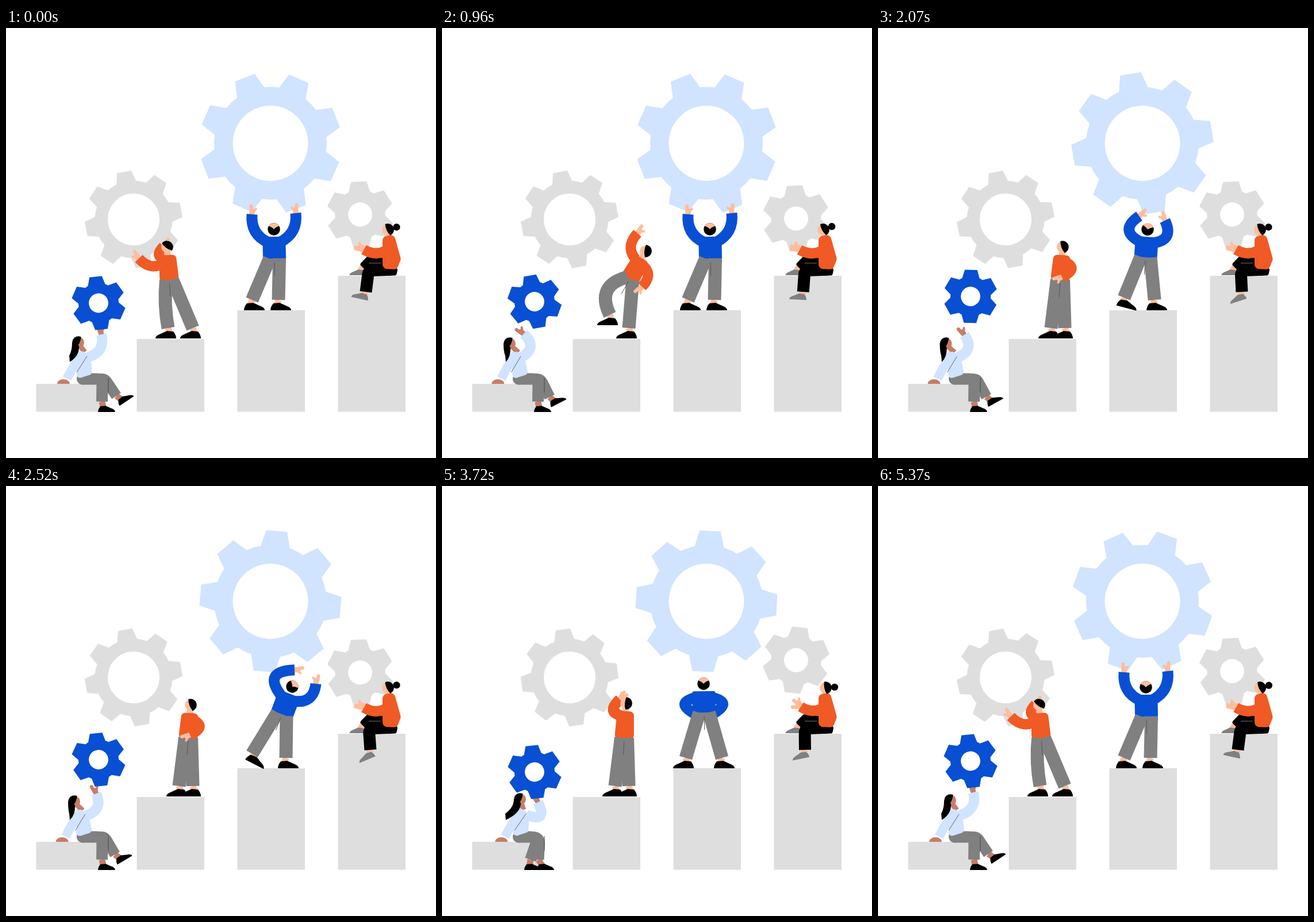
Write an HTML page with a canvas that moves like this. It is 748 px wide and 748 px high and loops after 5.4 s.

```html
<!DOCTYPE html>
<html lang="en">
<head>
<meta charset="utf-8">
<title>Gears and steps</title>
<style>
html, body { margin: 0; width: 100%; height: 100%; overflow: hidden; background: #fff; }
canvas { display: block; }
</style>
</head>
<body>
<canvas id="stage" width="748" height="748"></canvas>
<script>
const c = document.getElementById('stage').getContext('2d');
const LOOP = 5400, STEP = 30, TAU = 2 * Math.PI;
const KEYS = [0, 960, 1560, 2520, 3720, 4530, 5370, LOOP];
const GREY = '#dedede', PALE = '#d0e3ff', BLUE = '#084fd3', ORANGE = '#f05a24',
  PANTS = '#808080', SKIN = '#ffbd9d', BROWN = '#c67d68', BLACK = '#000';
const rad = d => d * Math.PI / 180;
const smooth = u => u * u * (3 - 2 * u);

// Blends numbers, points or whole poses.
function mix(a, b, u) {
  if (typeof a === 'number') return a + (b - a) * u;
  if (Array.isArray(a)) return a.map((v, i) => mix(v, b[i], u));
  return Object.fromEntries(Object.keys(a).map(k => [k, mix(a[k], b[k], u)]));
}
function sample(list, t, ease = smooth) {
  let i = 0;
  while (t >= KEYS[i + 1]) i++;
  return mix(list[i] ?? list[0], list[i + 1] ?? list[0], ease((t - KEYS[i]) / (KEYS[i + 1] - KEYS[i])));
}

// ---- drawing helpers ----
function placed(x, y, angle, draw) {
  c.save();
  c.translate(x, y);
  c.rotate(angle);
  draw();
  c.restore();
}
function disc(x, y, r, color) {
  c.fillStyle = color;
  c.beginPath();
  c.arc(x, y, r, 0, TAU);
  c.fill();
}
function line(color, w, x0, y0, x1, y1, cap = 'butt') {
  c.strokeStyle = color;
  c.lineWidth = w;
  c.lineCap = cap;
  c.beginPath();
  c.moveTo(x0, y0);
  c.lineTo(x1, y1);
  c.stroke();
}
// Point beside the middle of a segment, where the elbow or knee pulls the curve.
function pull(x0, y0, x1, y1, bow) {
  const dx = x1 - x0, dy = y1 - y0, k = 2 * bow / Math.hypot(dx, dy);
  return [(x0 + x1) / 2 + dy * k, (y0 + y1) / 2 - dx * k];
}
function limb(color, w, x0, y0, x1, y1, bow = 0) {
  c.strokeStyle = color;
  c.lineWidth = w;
  c.lineCap = 'butt';
  c.beginPath();
  c.moveTo(x0, y0);
  c.quadraticCurveTo(...pull(x0, y0, x1, y1, bow), x1, y1);
  c.stroke();
}
function hand(x, y, angle, side, color) {
  placed(x, y, angle, () => {
    line(color, 9, -2, 0, 6, 0, 'round');
    line(color, 6, 4, -2 * side, 14, -3 * side, 'round');
    line(color, 4, 5, 2 * side, 10, 6 * side, 'round');
  });
}
function arm(color, skin, w, x, y, [hx, hy, bow], side) {
  const [px, py] = pull(x, y, hx, hy, bow);
  hand(hx, hy, Math.atan2(hy - py, hx - px), side, skin);
  limb(color, w, x, y, hx, hy, bow);
}
// Seated leg with a rounded knee.
function bentLeg(color, w, x0, y0, x1, y1, x2, y2) {
  disc(x0, y0, w / 2, color);
  c.strokeStyle = color;
  c.lineWidth = w;
  c.lineCap = 'butt';
  c.beginPath();
  c.moveTo(x0, y0);
  c.arcTo(x1, y1, x2, y2, 10);
  c.lineTo(x2, y2);
  c.stroke();
}
function poly(p, r, color) {
  const n = p.length;
  c.fillStyle = color;
  c.beginPath();
  c.moveTo((p[0] + p[n - 2]) / 2, (p[1] + p[n - 1]) / 2);
  for (let i = 0; i < n; i += 2) c.arcTo(p[i], p[i + 1], p[(i + 2) % n], p[(i + 3) % n], r);
  c.closePath();
  c.fill();
}
function shoe(x, y, deg, dir, hx, hy, skin, color, s = 1) {
  placed(x, y, rad(deg), () => {
    const heel = c.getTransform().transformPoint(new DOMPoint(-7 * dir * s, -9 * s));
    c.save();
    c.resetTransform();
    line(skin, 11, hx, hy, heel.x, heel.y);
    c.restore();
    c.scale(dir * s, s);
    c.fillStyle = color;
    c.beginPath();
    c.moveTo(18, 0);
    c.quadraticCurveTo(18, -5, 9, -8);
    c.lineTo(-2, -13);
    c.lineTo(-13, -12);
    c.quadraticCurveTo(-18, -6, -18, 0);
    c.fill();
  });
}
function sideHead(x, y, deg, skin) {
  disc(x, y, 10, skin);
  placed(x, y, rad(deg), () => {
    c.fillStyle = BLACK;
    c.beginPath();
    c.arc(0, 0, 10.8, -TAU / 4, TAU / 4);
    c.quadraticCurveTo(-4, 0, 0, -10.8);
    c.fill();
  });
}
function raisedHead(x, y, deg) {
  disc(x, y, 10.7, BLACK);
  placed(x, y, rad(deg), () => {
    c.fillStyle = SKIN;
    c.beginPath();
    c.arc(0, 0, 10.8, rad(212), rad(328));
    c.quadraticCurveTo(4, -4, 0, 0);
    c.quadraticCurveTo(-4, -4, -9.2, -5.7);
    c.fill();
  });
}

const BIG = { n: 8, top: 122.5, half: 18.3, body: 98, base: 15, hole: 65.5 };
const SMALL = { n: 6, top: 57.3, half: 13.5, body: 43.5, base: 25.5, hole: 21 };
function gear(g, x, y, deg, s, color) {
  placed(x, y, rad(deg), () => {
    c.scale(s, s);
    c.fillStyle = color;
    c.beginPath();
    const step = 360 / g.n;
    for (let i = 0; i < g.n; i++) {
      const k = rad(i * step), co = Math.cos(k), si = Math.sin(k);
      for (const h of [-g.half, g.half]) c.lineTo(h * co + g.top * si, h * si - g.top * co);
      c.arc(0, 0, g.body, rad(i * step + g.base - 90), rad((i + 1) * step - g.base - 90));
    }
    c.closePath();
    c.moveTo(g.hole, 0);
    c.arc(0, 0, g.hole, 0, TAU);
    c.fill('evenodd');
  });
}

// ---- motion ----
const bigSpin = [23.7, 68.4, 108.6, 140.1, 183, 218.7, 245.4, 248.7];
const leftSpin = [-11.4, -11.4, -13.7, -10, -8, -13.3];
const tossed = [[161, 478.5, -6.3], [161, 476, -10], [161, 456, 9], [161, 476, -5.5], [161, 497.5, -6], [175.5, 490, 3]];
const juggled = [[324.5, -2.3], [331.5, -2.5], [324.5, -2], [324.5, -2.5], [303, 6.5], [305.5, 0], [322, -2.8]];

// Hands: x, y, elbow bow. Feet: x, y, turn, direction, knee bow.
const rest = {
  head: [321, 381, -20], hip: [317, 438], far: [322, 425, 0], near: [320, 433, 17],
  footA: [297, 540, 0, -1, 0], footB: [321, 540, 0, -1, 0]
};
const push = { ...rest, head: [280, 381, -55], hip: [284, 438], far: [274, 380, 12], near: [231, 401, 12], footA: [278, 540, 0, -1, -3] };
const recoil = { ...rest, head: [354, 388, 5], hip: [327, 436], far: [340, 357, 13], near: [348, 450, 13], footA: [288, 517, 0, -1, -22] };
const peer = { ...rest, head: [320, 378, 5], far: [309, 371, 15], near: [309, 371, 17] };
const reach = { ...rest, head: [330, 386, 0], hip: [313, 440], far: [293, 433, 0], near: [289, 388, 14], footA: [280, 538, 0, -1, -4], footB: [320, 540, 0, -1, -8] };
const pusher = {
  color: ORANGE, armW: 18, legW: 23, top: 29, waist: 34, neck: 14, shoulder: 23, spread: 0, hips: 5.5,
  poses: [push, recoil, rest, rest, peer, reach, push]
};

const lift = {
  head: [466, 350, 0], hip: [467, 401], far: [428, 324, 10], near: [504, 322, -10],
  footA: [432, 491, 0, 1, 0], footB: [478, 491, 0, 1, 0]
};
const swingLeft = { ...lift, head: [434, 352, -28], hip: [448, 401], far: [397, 336, 11], near: [451, 324, -19] };
const swingRight = { ...lift, head: [498, 349, 45], hip: [480, 397], far: [502, 320, 26], near: [539, 344, -13], footA: [432, 484, 27, 1, 0], footB: [491, 491, 0, 1, 0] };
const akimbo = { ...lift, head: [455, 344, 0], hip: [456, 394], far: [441, 397, -21], near: [470, 397, 21], footA: [420, 491, 0, -1, 0], footB: [491, 491, 0, 1, 0] };
const lifter = {
  color: BLUE, armW: 19, legW: 23, top: 40, waist: 40, neck: 13, shoulder: 23, spread: 10, hips: 8.5, up: true,
  poses: [lift, lift, swingLeft, swingRight, akimbo, akimbo, lift]
};

const hold = { head: [126, 547], hand: [166, 533, -11], kick: 1, tuck: 0 };
const shade = { head: [118, 549], hand: [142, 532, -14], kick: .8, tuck: 0 };
const beckon = { head: [119, 549], hand: [157, 535, -12], kick: .9, tuck: 0 };
const duck = { head: [136, 545], hand: [167, 550, -19], kick: 0, tuck: 1 };
const raise = { head: [129, 546], hand: [173, 544, -14], kick: 0, tuck: 0 };
const catcher = [hold, shade, shade, beckon, duck, raise, hold];

// ---- figures ----
function standing(f, t) {
  const p = sample(f.poses, t), [hx, hy, tilt] = p.head, [px, py] = p.hip;
  const len = Math.hypot(px - hx, py - hy), ux = (px - hx) / len, uy = (py - hy) / len;
  // Body point: distance down the spine from the head, offset to the side.
  const body = (down, side) => [hx + ux * down + uy * side, hy + uy * down - ux * side];
  const leg = ([x, y, deg, dir, bow], side) => {
    const hemX = x - dir * 4, hemY = y - 18;
    shoe(x, y, deg, dir, hemX, hemY, SKIN, BLACK);
    limb(PANTS, f.legW, ...body(len, side), hemX, hemY, bow);
  };
  const near = () => arm(f.color, SKIN, f.armW, ...body(f.shoulder, f.spread), p.near, -1);

  arm(f.color, SKIN, f.armW, ...body(f.shoulder, -f.spread), p.far, 1);
  if (f.up) near();
  else line(SKIN, 11, hx, hy, ...body(f.neck + 3, 0));
  poly([
    ...body(f.neck, -f.top / 2), ...body(f.neck, f.top / 2),
    ...body(len + 2, f.waist / 2), ...body(len + 2, -f.waist / 2)
  ], f.up ? 3 : 7, f.color);
  leg(p.footA, -f.hips);
  leg(p.footB, f.hips);
  line(PANTS, f.waist, ...body(len, 0), ...body(len + 8, 0));
  line('#555', 1, ...body(len + 6, 0), ...body(len + 30, 0));
  if (!f.up) near();
  (f.up ? raisedHead : sideHead)(hx, hy, tilt, SKIN);
}

function seatedLeft(t) {
  const { head: [hx, hy], hand: palm, kick, tuck } = sample(catcher, t);
  const sx = hx / 2 + 74, sy = hy / 4 + 427, wx = hx / 3 + 64;
  const farHem = mix([168, 650], [192, 640], kick);
  const farFoot = mix([176 + 4 * tuck, 668, 0], [210, 649, -34], kick);
  const hemX = 167 - 13 * tuck;

  shoe(...farFoot, 1, ...farHem, BROWN, BLACK, .83);
  bentLeg(PANTS, 19, 133, 610.5, 170 + 2 * kick, 610.5, ...farHem);
  shoe(175 - 17 * tuck, 668, 0, 1, hemX, 650, BROWN, BLACK, .83);
  bentLeg(PANTS, 20, 133, 610.5, 167.5, 610.5, hemX, 650);
  line('#444', 1, 178, 609, 178, 634);
  c.fillStyle = BROWN;
  c.beginPath();
  c.ellipse(wx - 6, 619, 11, 8, 0, Math.PI, 0);
  c.fill();
  line(BROWN, 9, hx, hy + 2, sx, sy);
  poly([sx - 10, sy - 6, sx + 10, sy + 7, 150, 602, 122, 611], 6, PALE);
  limb(PALE, 16, sx - 4, sy + 2, wx, 610, -1);
  arm(PALE, BROWN, 18, sx + 5, sy + 9, palm, 1);
  line('#666', 1, sx + 4, sy + 7, wx + 17, 599);
  sideHead(hx, hy, 205, BROWN);
  c.fillStyle = BLACK;
  c.beginPath();
  c.moveTo(hx - 11, hy);
  c.quadraticCurveTo(hx - 11, hy + 14, 110, 570);
  c.lineTo(111, 581);
  c.quadraticCurveTo(hx + 2, hy + 23, hx + 1, hy + 6);
  c.fill();
}

// The body follows the gear: bob is 0 in the air and 1 in the hands.
function seatedRight(t, gearY) {
  const bob = (gearY - 303) / 22, sway = Math.cos(TAU * t / LOOP);
  const hx = 667 - 3 * bob, hy = 351, tilt = -4 - 13 * bob;
  const wx = 624 - 1.5 * bob, wy = 384 + 1.5 * bob;
  const hem = [630 - 4 * sway, 459];

  shoe(611, 430, 0, -1, 622, 414, SKIN, PANTS, .75);
  poly([629, 397, 658, 400, 664, 417, 682, 417, 679, 430.5, 636, 432, 615, 411], 4, BLACK);
  shoe(622 - 7 * sway, 473.5 - 2.5 * sway, -5 + 18 * sway, -1, ...hem, SKIN, PANTS, .83);
  bentLeg(BLACK, 21, 668, 420, 631, 420, ...hem);
  line('#777', 1, 631, 409, 652, 409);
  line(SKIN, 10, hx, hy, 667, 369);
  poly([655, 363, 675, 359, 687, 402, 680, 420, 655, 419], 8, ORANGE);
  hand(wx, wy - 3, rad(195 + 30 * Math.abs(bob - 1)), 1, SKIN);
  hand(wx, wy, rad(190 + 8 * bob), 1, SKIN);
  limb(ORANGE, 18, 669, 382, wx, wy, 8);
  disc(hx + 16 * Math.cos(rad(tilt)), hy + 16 * Math.sin(rad(tilt)), 6.2, BLACK);
  sideHead(hx, hy, tilt - 8, SKIN);
}

function frame(now) {
  const t = Math.floor((now % LOOP) / STEP) * STEP;
  const [gearY, gearSpin] = sample(juggled, t);
  c.fillStyle = '#fff';
  c.fillRect(0, 0, 748, 748);
  c.fillStyle = GREY;
  [619, 541, 491, 431].forEach((y, i) => c.fillRect(52.5 + 175 * i, y, 117.5, 667.5 - y));
  gear(BIG, 460, 200.5, sample(bigSpin, t, u => u), 1, PALE);
  gear(BIG, 222, 333, sample(leftSpin, t), .688, GREY);
  gear(SMALL, 616, gearY, gearSpin, 1, GREY);
  seatedLeft(t);
  gear(SMALL, ...sample(tossed, t), .805, BLUE);
  standing(pusher, t);
  standing(lifter, t);
  seatedRight(t, gearY);
}

let start;
function tick(now) {
  start ??= now;
  frame(now - start);
  requestAnimationFrame(tick);
}
frame(0);
requestAnimationFrame(tick);
</script>
</body>
</html>
```
